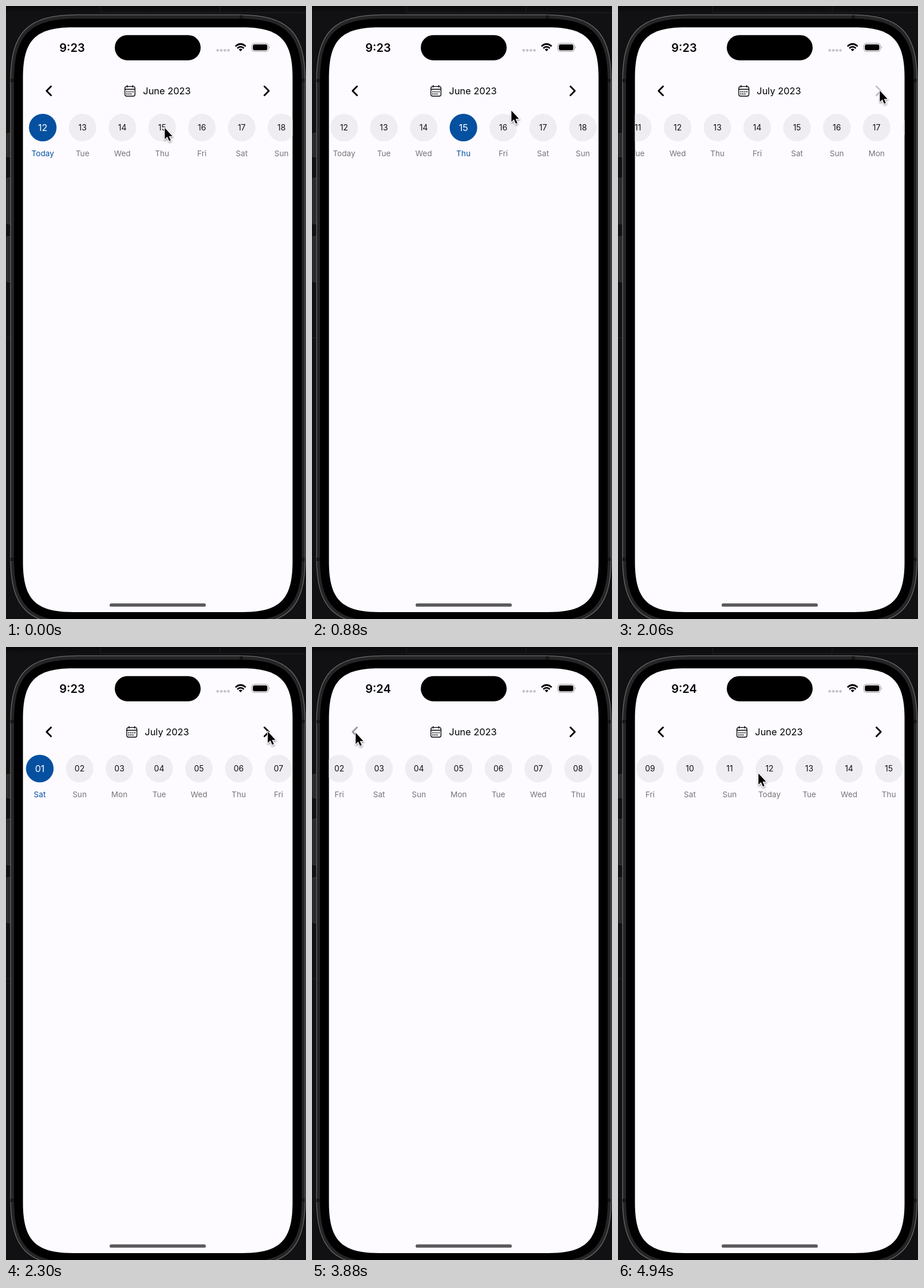
An HTML page that plays this animation: 524 by 1069 pixels, repeating every 5 s.

```html
<!DOCTYPE html>
<html lang="en">
<head>
<meta charset="utf-8">
<title>Day picker</title>
<style>
  html, body { margin: 0; width: 100%; height: 100%; overflow: hidden; background: #111013; }
  svg { display: block; width: 100vw; height: 100vh; }
  text { font-family: Inter, "Open Sans", sans-serif; text-anchor: middle; }
</style>
</head>
<body>
<svg id="stage" viewBox="0 0 524 1069">
  <defs>
    <clipPath id="screenClip"><path id="clipShape"/></clipPath>
    <filter id="shadow" x="-50%" y="-50%" width="220%" height="220%">
      <feDropShadow dx="0.5" dy="2" stdDeviation="1.6" flood-color="#000" flood-opacity=".4"/>
    </filter>
    <linearGradient id="topShade" x2="0" y2="1">
      <stop offset="0" stop-color="#09080a"/><stop offset="1" stop-color="#111013"/>
    </linearGradient>
  </defs>

  <rect width="524" height="1069" fill="#111013"/>
  <rect width="524" height="12" fill="url(#topShade)"/>
  <path d="M165 0V11.5H524M374 0V11M0 578.5H8" fill="none" stroke="#222124"/>
  <g id="buttons" fill="#29282a" stroke="#3d3c3f"></g>

  <path id="rim" fill="#252426" stroke="#69686a" stroke-width="1.3"/>
  <path d="M408 16H414V23H408ZM8 127H15V133H8ZM8 962H15V968H8ZM516 127H522V133H516ZM516 962H522V968H516Z" fill="#171618"/>
  <path id="bezel" fill="#000"/>
  <path id="screen" fill="#fdfbff"/>

  <text id="clock" x="115.5" y="79.5" font-size="20" font-weight="600"></text>
  <rect x="190" y="50.7" width="150" height="44" rx="22"/>
  <g fill="#c5c4c8">
    <circle cx="369.7" cy="77.3" r="2.4"/><circle cx="376" cy="77.3" r="2.4"/>
    <circle cx="382.3" cy="77.3" r="2.4"/><circle cx="388.6" cy="77.3" r="2.4"/>
  </g>
  <g fill="none" stroke="#000" stroke-width="2.8">
    <path d="M400.8 70.2Q409.7 62.3 418.6 70.2"/>
    <path d="M404 73.7Q409.7 68.6 415.4 73.7"/>
    <path d="M406.5 75.7Q409.7 73.3 412.9 75.7L409.7 79Z" fill="#000" stroke="none"/>
  </g>
  <rect x="429.3" y="65.1" width="29" height="14" rx="4.6" fill="none" stroke="#a5a4a7" stroke-width="1.2"/>
  <rect x="431.2" y="67" width="25.2" height="10.2" rx="3"/>
  <path d="M459.9 69.8Q462.3 72 459.9 74.4Z" fill="#a5a4a7"/>

  <g fill="none" stroke="#000" stroke-width="3" stroke-linecap="round" stroke-linejoin="round">
    <path id="prev" d="M78.6 140.3L70.9 148L78.6 155.7"/>
    <path id="next" d="M451.4 140.3L459.1 148L451.4 155.7"/>
  </g>
  <g id="icon">
    <g fill="none" stroke="#000" stroke-width="1.4" stroke-linecap="round">
      <rect x="207.7" y="140.4" width="17.6" height="16.8" rx="3.2"/>
      <path d="M211.6 138.5V141.5M221.4 138.5V141.5M207.7 145.2H225.3"/>
    </g>
    <g id="iconDots"></g>
  </g>
  <text id="title" x="281" y="153.9" font-size="16.4"></text>

  <g clip-path="url(#screenClip)"><g id="days"></g></g>

  <rect x="181" y="1041.8" width="168" height="5.8" rx="2.9" fill="#5a595c"/>

  <path id="cursor" filter="url(#shadow)" stroke="#fff" stroke-width="2.4" paint-order="stroke" stroke-linejoin="round"
    d="M0 0V19.6L4.4 15.4L7.7 22.8L10.5 21.5L7.3 14.3H13.3Z"/>
</svg>
<script>
const LOOP = 5000, STEP = 10, PITCH = 69.5, FIRST_X = 64.2, MID_X = 264.5;
const BLUE = "#0550a0", GREY = "#efedf1";
const WEEK = ["Sun", "Mon", "Tue", "Wed", "Thu", "Fri", "Sat"];
const JUNE = { name: "June 2023", start: 4, length: 30, today: 12, iconShift: 0 };
const JULY = { name: "July 2023", start: 6, length: 31, today: 0, iconShift: 3.3 };
const PICK = 390, TO_JULY = 2030, TO_JUNE = 3800;

const $ = id => document.getElementById(id);
const add = (parent, tag, attrs) => {
  const el = document.createElementNS("http://www.w3.org/2000/svg", tag);
  set(el, attrs);
  return parent.appendChild(el);
};
function set(el, attrs) {
  for (const key in attrs) el.setAttribute(key, attrs[key]);
}

// Rounded box with continuous corners: e is the corner's extent, h the handle distance.
function squircle(l, t, r, b, e, h) {
  return `M${l} ${t + e}C${l} ${t + h} ${l + h} ${t} ${l + e} ${t}H${r - e}` +
    `C${r - h} ${t} ${r} ${t + h} ${r} ${t + e}V${b - e}` +
    `C${r} ${b - h} ${r - h} ${b} ${r - e} ${b}H${l + e}` +
    `C${l + h} ${b} ${l} ${b - h} ${l} ${b - e}Z`;
}
const glass = squircle(29.6, 37.2, 500.5, 1057, 88, 22);
set($("screen"), { d: glass });
set($("clipShape"), { d: glass });
set($("bezel"), { d: squircle(14, 22, 516.5, 1073, 108, 28) });
set($("rim"), { d: squircle(8, 15.3, 522.5, 1079, 116, 30) });

for (const [y, height] of [[222, 41], [300, 80], [402, 79]])
  add($("buttons"), "rect", { x: 1.5, y, width: 7, height, rx: 1 });

[4, 3].forEach((count, row) => {
  for (let i = 0; i < count; i++)
    add($("iconDots"), "circle", { cx: 211.3 + i * 3.5, cy: 149.6 + row * 3.8, r: 1.1 });
});

const cells = Array.from({ length: 31 }, (_, i) => {
  const g = add($("days"), "g", { transform: `translate(${FIRST_X + i * PITCH} 0)` });
  return {
    g,
    disc: add(g, "circle", { cy: 212, r: 24.1 }),
    num: add(g, "text", {}),
    label: add(g, "text", { y: 262, "font-size": 13.6 })
  };
});

const clamp = u => Math.min(1, Math.max(0, u));
const ease = {
  both: u => u * u * (3 - 2 * u),
  in: u => u * u,
  out: u => 1 - (1 - u) * (1 - u)
};
const tween = (t, start, span, from, to) =>
  from + (to - from) * ease.both(clamp((t - start) / span));

const centred = day => FIRST_X + (day - 1) * PITCH - MID_X;

function scrollAt(t) {
  if (t < TO_JULY) return tween(t, PICK, 300, 11 * PITCH, centred(15));
  if (t < TO_JUNE) return tween(t, 2014.4, 300, centred(15), 0);
  return tween(t, 3806, 300, 0, centred(12));
}

// Each stop: time, x, y and the easing used to reach it.
const PATH = [
  [0, 277.3, 212.6], [680, 277.3, 212.6], [880, 348.3, 182.4, "in"], [1250, 457.3, 147.6, "out"],
  [2600, 457.3, 147.6], [2850, 72.3, 170.4, "both"], [3150, 72.3, 170.4], [3500, 76.3, 149.6, "both"],
  [4307, 76.3, 149.6], [4520, 286, 148, "both"], [4690, 286, 148], [4940, 245.3, 220.4, "both"],
  [LOOP, 245.3, 220.4]
];
function cursorAt(t) {
  const i = PATH.findIndex(stop => stop[0] > t);
  const [t0, x0, y0] = PATH[i - 1], [t1, x1, y1, kind = "both"] = PATH[i];
  const u = ease[kind]((t - t0) / (t1 - t0));
  return [x0 + (x1 - x0) * u, y0 + (y1 - y0) * u];
}

// Fades out while held, back in after the release.
const pressed = (t, release) =>
  t < release ? tween(t, release - 180, 150, 1, 0.2) : tween(t, release, 250, 0.2, 1);

let shown = "";
function fillDays(month, selected) {
  const key = month.name + selected;
  if (key === shown) return;
  shown = key;
  $("title").textContent = month.name;
  set($("icon"), { transform: `translate(${month.iconShift} 0)` });
  cells.forEach(({ g, disc, num, label }, i) => {
    const day = i + 1, on = day === selected;
    set(g, { visibility: day > month.length ? "hidden" : "visible" });
    set(disc, { fill: on ? BLUE : GREY });
    set(num, { y: on ? 217.8 : 217.1, "font-size": on ? 16.2 : 14, fill: on ? "#fff" : "#111" });
    set(label, { fill: on ? BLUE : "#757478" });
    num.textContent = String(day).padStart(2, "0");
    label.textContent = day === month.today ? "Today" : WEEK[(month.start + i) % 7];
  });
}

function draw(t) {
  const july = t >= TO_JULY && t < TO_JUNE;
  fillDays(july ? JULY : JUNE, t < PICK ? 12 : t < TO_JULY ? 15 : july ? 1 : 0);
  set($("days"), { transform: `translate(${-scrollAt(t)} 0)` });
  set($("next"), { opacity: pressed(t, TO_JULY) });
  set($("prev"), { opacity: pressed(t, TO_JUNE) });
  set($("cursor"), { transform: `translate(${cursorAt(t)})` });
  $("clock").textContent = t < 2610 ? "9:23" : "9:24";
}

const began = performance.now();
function tick() {
  const elapsed = performance.now() - began;
  draw(Math.round(elapsed / STEP) * STEP % LOOP);
  requestAnimationFrame(tick);
}
tick();
</script>
</body>
</html>
```
